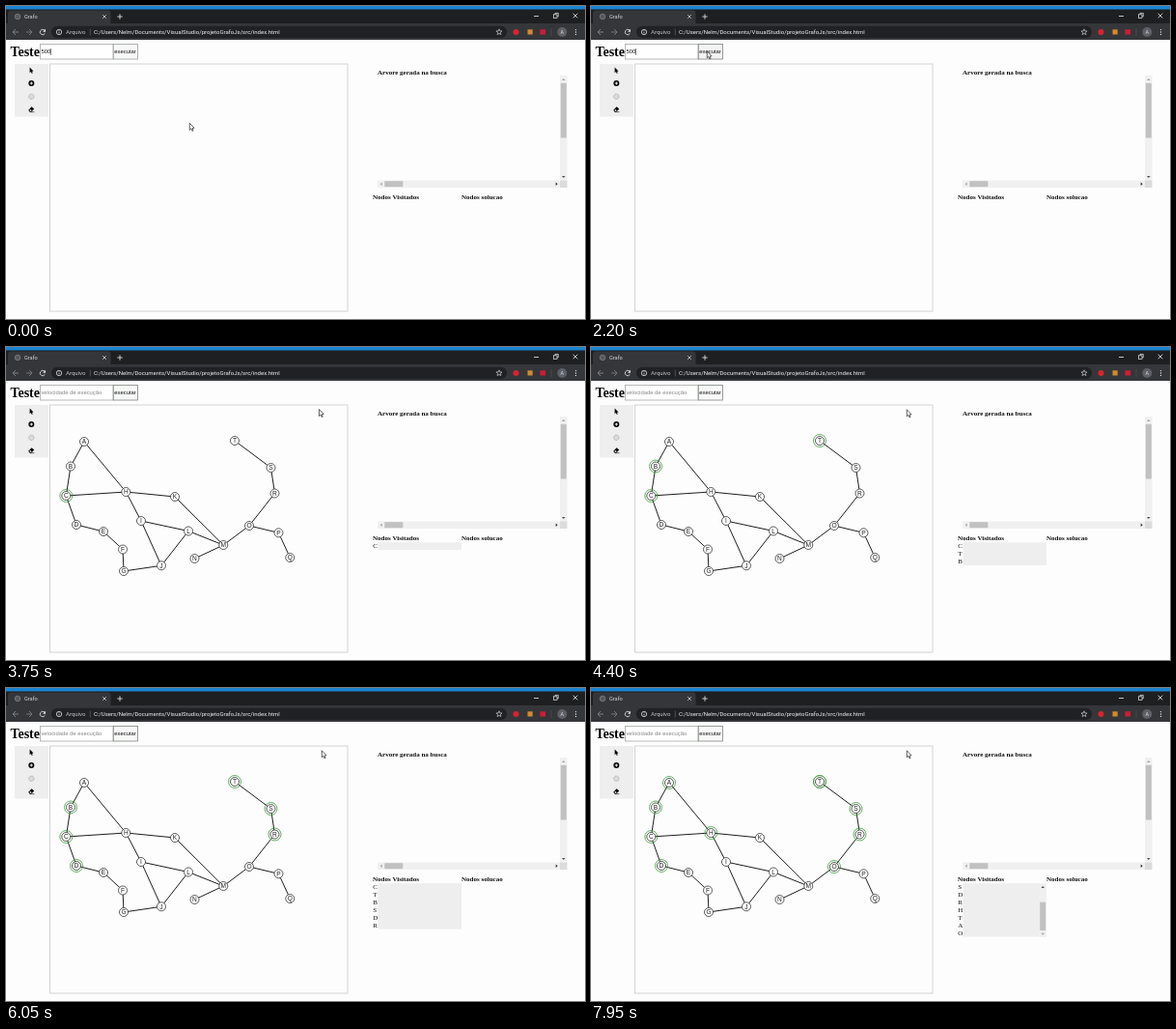
Recreate the animation shown at these times as an HTML page with a canvas. Size 600 px wide and 324 px high, loop 8000 ms.

```html
<!DOCTYPE html>
<html lang="pt">
<head>
<meta charset="utf-8">
<title>Grafo</title>
<style>
  html, body { margin: 0; width: 100%; height: 100%; overflow: hidden; background: #fdfdfd; }
  canvas { display: block; width: 600px; height: 324px; }
</style>
</head>
<body>
<canvas id="stage" width="600" height="324"></canvas>
<script>
const ctx = document.getElementById('stage').getContext('2d');
const LOOP = 8000, CLICK = 2875, STEP = 500, ROWS = 7, ROW_H = 7.9;
const SERIF = '"Liberation Serif", serif';
const SANS = '"Liberation Sans", sans-serif';
const UI = 'Roboto, sans-serif';

const nodes = {
  A: [81, 98], B: [67, 123.5], C: [62.3, 154], D: [73, 184], E: [101, 191],
  F: [121, 209.5], G: [122, 232], H: [124.3, 150], I: [140, 180], J: [161, 226.3],
  K: [175, 155], L: [189, 190.5], M: [225.3, 205], N: [195.5, 219], O: [252, 185],
  P: [282.5, 192.3], Q: [294.3, 218], R: [278.5, 151.5], S: [274.5, 125], T: [237, 97]
};
const edges = 'AB BC AH CH CD DE EF FG GJ HK HI IJ IL LJ LM KM MN MO OR OP PQ RS ST'.split(' ');
const visits = 'CTBSDRHTAO';

// Pointer path: [time, x, y]
const path = [[0, 190, 121], [900, 190, 121], [1800, 120, 46.5], [2400, 120, 46.5],
  [2750, 123, 43.5], [3100, 123, 43.5], [3800, 327, 64.5], [LOOP, 327, 64.5]];

function rect(x, y, w, h, color) {
  ctx.fillStyle = color;
  ctx.fillRect(x, y, w, h);
}

function frame(x, y, w, h, color, width = 1) {
  ctx.strokeStyle = color;
  ctx.lineWidth = width;
  ctx.strokeRect(x, y, w, h);
}

function text(str, x, y, size, family, color = '#111', style = '') {
  ctx.font = `${style} ${size}px ${family}`;
  ctx.fillStyle = color;
  ctx.fillText(str, x, y);
}

function poly(points, fill, stroke, width = 1, close = true) {
  ctx.beginPath();
  for (let i = 0; i < points.length; i += 2) ctx.lineTo(points[i], points[i + 1]);
  if (close) ctx.closePath();
  paint(fill, stroke, width);
}

function line(color, width, ...points) {
  poly(points, null, color, width, false);
}

function circle(x, y, r, fill, stroke, width = 1) {
  ctx.beginPath();
  ctx.arc(x, y, r, 0, Math.PI * 2);
  paint(fill, stroke, width);
}

function paint(fill, stroke, width) {
  if (fill) { ctx.fillStyle = fill; ctx.fill(); }
  if (stroke) { ctx.strokeStyle = stroke; ctx.lineWidth = width; ctx.stroke(); }
}

function cross(x, y, r, color, width) {
  line(color, width, x - r, y - r, x + r, y + r);
  line(color, width, x - r, y + r, x + r, y - r);
}

function plus(x, y, r, color, width) {
  line(color, width, x - r, y, x + r, y);
  line(color, width, x, y - r, x, y + r);
}

// Small scrollbar triangle; angle 0 points up
function tick(x, y, angle, color) {
  ctx.save();
  ctx.translate(x, y);
  ctx.rotate(angle);
  poly([-1.8, 0.9, 0, -1.1, 1.8, 0.9], color);
  ctx.restore();
}

function arrow(x, y, dir, color) {
  line(color, 0.9, x - 3 * dir, y, x + 3 * dir, y);
  line(color, 0.9, x, y - 3, x + 3 * dir, y, x, y + 3);
}

function drawBrowser() {
  rect(0, 0, 600, 4, '#1a84d2');
  rect(0, 3.5, 600, 15, '#1d1f21');
  rect(0, 18, 600, 17, '#35363a');
  ctx.beginPath();
  ctx.roundRect(2, 4.5, 106.5, 14, [3, 3, 0, 0]);
  paint('#35363a');

  circle(12, 11, 2.8, '#55595d', '#85898d', 0.7);
  text('Grafo', 19, 13.2, 5.6, UI, '#d5d7da');
  cross(102, 11, 1.8, '#dcdcdc', 0.8);
  plus(118, 11, 2.7, '#dcdcdc', 0.9);

  line('#eee', 0.8, 547, 10.5, 552, 10.5);
  frame(567.5, 8.8, 3.5, 3.5, '#eee', 0.7);
  line('#eee', 0.7, 569, 8.6, 569, 7.4, 572.3, 7.4, 572.3, 10.8, 571, 10.8);
  cross(590, 10, 2.3, '#eee', 0.8);

  arrow(10, 27, -1, '#85888b');
  arrow(24, 27, 1, '#7a7d80');
  ctx.beginPath();
  ctx.arc(38, 27, 2.7, 0.5, 5.6);
  paint(null, '#dcdee0', 0.9);
  poly([41, 23.8, 41, 26.8, 38, 26.8], '#dcdee0');

  ctx.beginPath();
  ctx.roundRect(47, 20.7, 472, 12.3, 6.1);
  paint('#202124');
  circle(55, 27, 2.7, null, '#dcdee0', 0.8);
  line('#dcdee0', 0.8, 55, 26.6, 55, 28.5);
  line('#dcdee0', 0.8, 55, 25.2, 55, 25.9);
  text('Arquivo', 62, 29.1, 6.02, UI, '#c4c7ca');
  line('#696c70', 0.6, 87.3, 23.5, 87.3, 30.5);
  text('C:/Users/Nelm/Documents/VisualStudio/projetoGrafoJs/src/index.html',
    91, 29.1, 6.02, UI, '#f0f1f2');

  const star = [];
  for (let i = 0; i < 10; i++) {
    const r = i % 2 ? 1.4 : 3.2, a = i * Math.PI / 5 - Math.PI / 2;
    star.push(511 + r * Math.cos(a), 27 + r * Math.sin(a));
  }
  poly(star, null, '#d0d2d4', 0.7);
  circle(528.5, 27, 3, '#d8242f');
  rect(540.5, 24.3, 5.2, 5.2, '#d08a2c');
  rect(553.5, 24.3, 5.6, 5.2, '#d01c35');
  line('#55585c', 0.6, 565, 23, 565, 31);
  circle(576.3, 27, 5, '#5d6167');
  text('A', 574.6, 29, 5.4, UI, '#e4e4e4');
  for (const y of [24.6, 27, 29.4]) circle(590.5, y, 0.7, '#e4e4e4');
}

function drawForm(t) {
  const clicked = t >= CLICK;
  text('Teste', 4.4, 52, 14, SERIF, '#000', 'bold');
  rect(35, 39.5, 76, 15.5, '#fff');
  frame(35.5, 39.5, 75.5, 15.5, '#a4aaa4', 0.8);
  if (clicked) {
    text('velocidade de execução', 36.4, 49.4, 5.86, SANS, '#858585');
  } else {
    text('500', 36.4, 49.4, 5.86, SANS, '#111');
    if (t % 1060 < 530) line('#111', 0.6, 46.4, 44, 46.4, 50.8);
  }
  const hover = t > 1700 && t < 3250;
  rect(111.3, 39.5, 25.2, 15.5, hover ? '#f3f3f3' : '#f8f8f8');
  frame(111.3, 39.5, 25.2, 15.5, clicked || hover ? '#7f857f' : '#9ca29c', 0.8);
  text('executar', 112.3, 49.4, 5.86, SANS, '#111');
}

function drawTools() {
  rect(9, 60, 35, 54.5, '#eeeeee');
  poly([24.6, 63.6, 24.6, 69.2, 25.9, 68, 26.8, 70, 27.7, 69.6, 26.9, 67.7, 28.5, 67.5], '#000');
  circle(26.3, 80, 3, '#000');
  plus(26.3, 80, 1.6, '#fff', 0.9);
  ctx.setLineDash([1, 0.6]);
  circle(26.3, 93.8, 2.7, '#dadada', '#a0a0a0', 0.8);
  ctx.setLineDash([]);
  poly([23.2, 107.8, 26.6, 104.3, 29.2, 106.6, 26, 109.8, 24.6, 109.8], '#000');
  poly([24.2, 107.9, 25.3, 106.9, 26.7, 108.2, 25.6, 109.1], '#eee');
  line('#000', 0.6, 25, 109.7, 29.4, 109.7);
}

function drawTreePanel() {
  text('Arvore gerada na busca', 385, 70.7, 7.03, SERIF, '#111', 'bold');
  rect(574, 72, 7.5, 108.5, '#f0f0f0');
  rect(385, 180.5, 189, 7.5, '#f0f0f0');
  rect(574, 180.5, 7.5, 7.5, '#dcdcdc');
  rect(574.8, 79.8, 6, 56.7, '#c1c1c1');
  rect(392.3, 181.2, 19, 6, '#c1c1c1');
  tick(577.8, 76, 0, '#a3a3a3');
  tick(577.8, 176.8, Math.PI, '#505050');
  tick(388.8, 184.2, -Math.PI / 2, '#a3a3a3');
  tick(570.6, 184.2, Math.PI / 2, '#303030');
}

function drawGraph(seen) {
  for (const [a, b] of edges) line('#111', 0.95, ...nodes[a], ...nodes[b]);
  for (const [name, [x, y]] of Object.entries(nodes)) circle(x, y, 4.5, '#fff', '#333', 0.8);
  for (const name of seen) circle(...nodes[name], 6.5, null, '#3d9b3d', 0.8);
  ctx.textAlign = 'center';
  for (const [name, [x, y]] of Object.entries(nodes)) text(name, x, y + 2.4, 6.6, SANS, '#222');
  ctx.textAlign = 'left';
}

function drawLists(seen) {
  text('Nodos Visitados', 380, 200.4, 7.03, SERIF, '#111', 'bold');
  text('Nodos solucao', 472, 200.4, 7.03, SERIF, '#111', 'bold');
  const shown = seen.slice(-ROWS);
  const h = shown.length * ROW_H;
  if (!h) return;
  rect(385.5, 202.2, 86.5, h, '#eeeeee');
  [...shown].forEach((name, i) => text(name, 380.3, 208.4 + i * ROW_H, 7.03, SERIF, '#111'));
  if (seen.length > ROWS) {
    const thumb = 42 * ROWS / seen.length;
    rect(464.5, 202.2, 7.5, h, '#f0f0f0');
    rect(465.2, 251 - thumb, 6, thumb, '#c1c1c1');
    tick(468.2, 206, 0, '#505050');
    tick(468.2, 254.6, Math.PI, '#a3a3a3');
  }
}

function drawPointer(t) {
  const i = path.findIndex(p => p[0] > t);
  const [t0, x0, y0] = path[i - 1], [t1, x1, y1] = path[i];
  const u = (t - t0) / (t1 - t0), e = u * u * (3 - 2 * u);
  ctx.save();
  ctx.translate(x0 + (x1 - x0) * e, y0 + (y1 - y0) * e);
  poly([0.3, 0.3, 0.3, 7.4, 1.9, 5.9, 3, 8.4, 4.1, 7.9, 3, 5.5, 5.1, 5.3], '#fff', '#222', 0.7);
  ctx.restore();
}

function draw(t) {
  const count = Math.max(0, Math.floor((t - CLICK) / STEP));
  const seen = visits.slice(0, count);
  rect(0, 0, 600, 324, '#fdfdfd');
  drawBrowser();
  drawForm(t);
  drawTools();
  frame(45.5, 60, 308.5, 256, '#cfcfcf', 0.9);
  drawTreePanel();
  if (t >= CLICK) drawGraph(seen);
  drawLists(seen);
  drawPointer(t);
}

const start = performance.now();
function tickFrame() {
  draw((performance.now() - start) % LOOP);
  requestAnimationFrame(tickFrame);
}
tickFrame();
</script>
</body>
</html>
```
